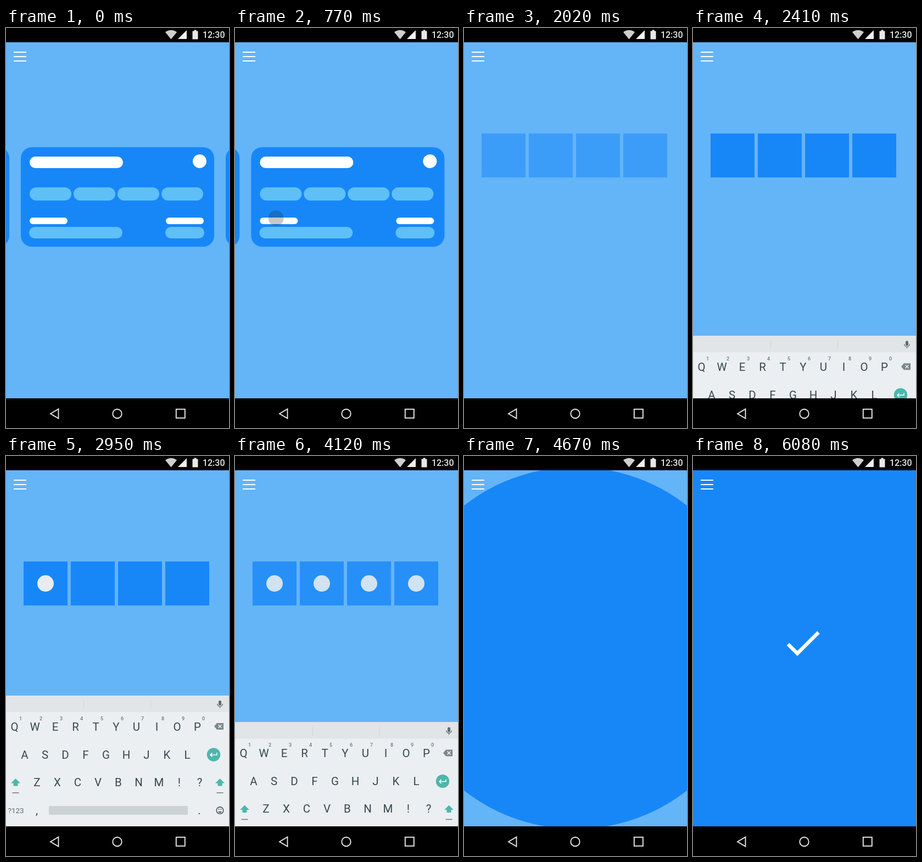
These frames come from a looping animation (406x728 px, 7160 ms). An HTML page:

```html
<!DOCTYPE html>
<html lang="en">
<head>
<meta charset="utf-8">
<title>Card payment</title>
<style>
html, body { margin: 0; width: 100%; height: 100%; overflow: hidden; background: #64b4f8; }
svg { display: block; width: 406px; height: 728px; font-family: Roboto, sans-serif; }
.key { font-size: 20.5px; fill: #37474f; text-anchor: middle; }
.digit { font-size: 9px; font-weight: 500; fill: #6b767b; text-anchor: middle; }
.line { fill: none; stroke: #e8eaea; stroke-width: 1.9; }
</style>
</head>
<body>
<svg viewBox="0 0 406 728">
  <defs>
    <g id="card">
      <rect y="217" width="352" height="181" rx="20" fill="#1787f8"/>
      <g fill="#fff">
        <rect x="16" y="234" width="170" height="21" rx="10.5"/>
        <rect x="16" y="345" width="69" height="12" rx="6"/>
        <rect x="264" y="345" width="69" height="12" rx="6"/>
        <circle cx="325.5" cy="242.5" r="12.5"/>
      </g>
      <g fill="#5fc0f8">
        <rect x="16" y="290" width="76" height="24" rx="12"/>
        <rect x="96" y="290" width="76" height="24" rx="12"/>
        <rect x="176" y="290" width="76" height="24" rx="12"/>
        <rect x="256" y="290" width="76" height="24" rx="12"/>
        <rect x="15" y="362" width="170" height="21" rx="10.5"/>
        <rect x="263" y="362" width="71" height="21" rx="10.5"/>
      </g>
    </g>
    <g id="shift">
      <path d="M0 587l8.500 8.500h-4.500v5h-8v-5h-4.500z" fill="#4db6ac"/>
      <path d="M-6 613h12" stroke="#6b767b" stroke-width="1.500"/>
    </g>
  </defs>

  <rect width="406" height="728" fill="#64b4f8"/>
  <g id="cards">
    <use href="#card" x="-346"/>
    <use href="#card" x="27"/>
    <use href="#card" x="400"/>
  </g>
  <circle id="touch" cy="346" fill="#222"/>
  <g id="pin"></g>

  <g id="keyboard">
    <rect y="436" width="406" height="240" fill="#ebeff1"/>
    <rect y="436" width="406" height="30" fill="#e1e5e8"/>
    <path d="M141.500 444v16M263.500 444v16" stroke="#d0d5d8"/>
    <rect x="387" y="445" width="5" height="9" rx="2.500" fill="#5f6b70"/>
    <path d="M384.700 451a4.800 4.800 0 0 0 9.600 0M389.500 456v3" fill="none" stroke="#5f6b70" stroke-width="1.300"/>
    <path d="M379 492l5-6h12v12h-12z" fill="#7c878c"/>
    <path d="M386.500 489l6 6m0-6l-6 6" stroke="#ebeff1" stroke-width="1.500"/>
    <circle cx="378" cy="543.5" r="12.200" fill="#4db6ac"/>
    <path d="M384 540v4h-12m3.500-3.500l-3.500 3.500l3.500 3.500" fill="none" stroke="#fff" stroke-width="1.500"/>
    <use href="#shift" x="17.500"/>
    <use href="#shift" x="389.500"/>
    <text x="3.500" y="650" font-size="13.500" fill="#5f6b70">?123</text>
    <rect x="78" y="637" width="253" height="16" rx="2" fill="#cdd2d4"/>
    <g fill="none" stroke="#37474f" stroke-width="1.400">
      <circle cx="389.500" cy="645" r="6.300"/>
      <path d="M386 647a3.800 3.800 0 0 0 7 0z" fill="#37474f" stroke="none"/>
      <path d="M386.500 643h2m2 0h2"/>
    </g>
  </g>

  <circle id="reveal" cx="203" cy="349.500" fill="#1787f8"/>
  <path d="M14 44h23M14 52h23M14 60h23" stroke="#fff" stroke-width="2"/>
  <path id="check" d="M173 342.500L190 359.300L228.500 321" pathLength="100" fill="none" stroke="#fff" stroke-width="6.600"/>

  <path d="M0 0h406v26h-406zM0 674h406v54h-406z"/>
  <path d="M290 7.500q10.500-7.500 21 0l-10.500 13z" fill="#cfcfcf"/>
  <path d="M329 4v16h-16z" fill="#f2f2f2"/>
  <path d="M339.500 5.500h3v-2h4v2h3v15h-10z" fill="#e8e8e8"/>
  <text x="398.500" y="18" font-size="16" font-weight="500" fill="#e8eaea" text-anchor="end">12:30</text>
  <path class="line" d="M81 702l14.500-8.500v17z"/>
  <circle class="line" cx="202.500" cy="702" r="8.200"/>
  <rect class="line" x="309.800" y="693.800" width="16" height="16"/>
</svg>
<script>
const LOOP = 7160;
const el = id => document.getElementById(id);

function add(parent, tag, attrs, text = '') {
  const node = document.createElementNS('http://www.w3.org/2000/svg', tag);
  for (const name in attrs) node.setAttribute(name, attrs[name]);
  node.textContent = text;
  parent.append(node);
  return node;
}

const keyboard = el('keyboard');
function addRow(keys, x, y) {
  [...keys].forEach((key, i) => add(keyboard, 'text', { class: 'key', x: x + 37 * i, y }, key));
}
addRow('QWERTYUIOP', 15.5, 500);
addRow('ASDFGHJKL', 34, 551);
addRow('ZXCVBNM!?', 56.5, 601);
addRow(',', 56, 652);
addRow('.', 352, 652);
[...'1234567890'].forEach((digit, i) =>
  add(keyboard, 'text', { class: 'digit', x: 26.5 + 37 * i, y: 480.5 }, digit));

const dots = [0, 1, 2, 3].map(i => {
  add(el('pin'), 'rect', { x: 32 + 86 * i, y: 192, width: 80, height: 80, fill: '#1787f8' });
  return add(el('pin'), 'circle', { cx: 72 + 86 * i, cy: 232, r: 15, fill: '#eee' });
});

// Easing: out and inOut take the power of the curve
const span = (t, from, to) => Math.min(1, Math.max(0, (t - from) / (to - from)));
const out = (p, n) => 1 - (1 - p) ** n;
const inOut = (p, n) => p < 0.5 ? (2 * p) ** n / 2 : 1 - (2 - 2 * p) ** n / 2;

function drawTouch(t, swipe) {
  const tapping = t >= 1300;
  const ripple = out(span(t, 1300, 1720), 2);
  const touch = el('touch');
  touch.setAttribute('cx', tapping ? 269 : 331 - 258 * swipe);
  touch.setAttribute('r', tapping ? 14 + 17 * ripple : 14);
  touch.setAttribute('opacity', 0.25 * (tapping
    ? 1 - span(t, 1400, 1780)
    : span(t, 50, 150) * (1 - span(t, 780, 960))));
}

function draw(t) {
  const swipe = inOut(span(t, 130, 900), 4);
  const leave = inOut(span(t, 1400, 1790), 2);
  // The row ends with the last card, so the swipe brings in the one on the right
  el('cards').setAttribute('transform', `translate(${-373 * swipe - 385 * leave})`);
  drawTouch(t, swipe);

  const close = span(t, 4060, 4360);
  el('pin').setAttribute('opacity', span(t, 1950, 2090) * (1 - close));
  dots.forEach((dot, i) => {
    const start = 2730 + 310 * i;
    dot.setAttribute('opacity', out(span(t, start, start + 300), 3));
  });
  const hidden = 1 - out(span(t, 2300, 2700), 2) + close;
  keyboard.setAttribute('transform', `translate(0 ${238 * hidden})`);

  el('reveal').setAttribute('r', 404 * out(span(t, 4500, 4800), 2));
  const drawn = 100 * inOut(span(t, 5000, 6080), 2);
  const check = el('check');
  check.setAttribute('stroke-dasharray', `${drawn} 200`);
  check.setAttribute('visibility', drawn > 0 ? 'visible' : 'hidden');
}

const begin = performance.now();
function tick() {
  draw((performance.now() - begin) % LOOP);
  requestAnimationFrame(tick);
}
tick();
</script>
</body>
</html>
```
